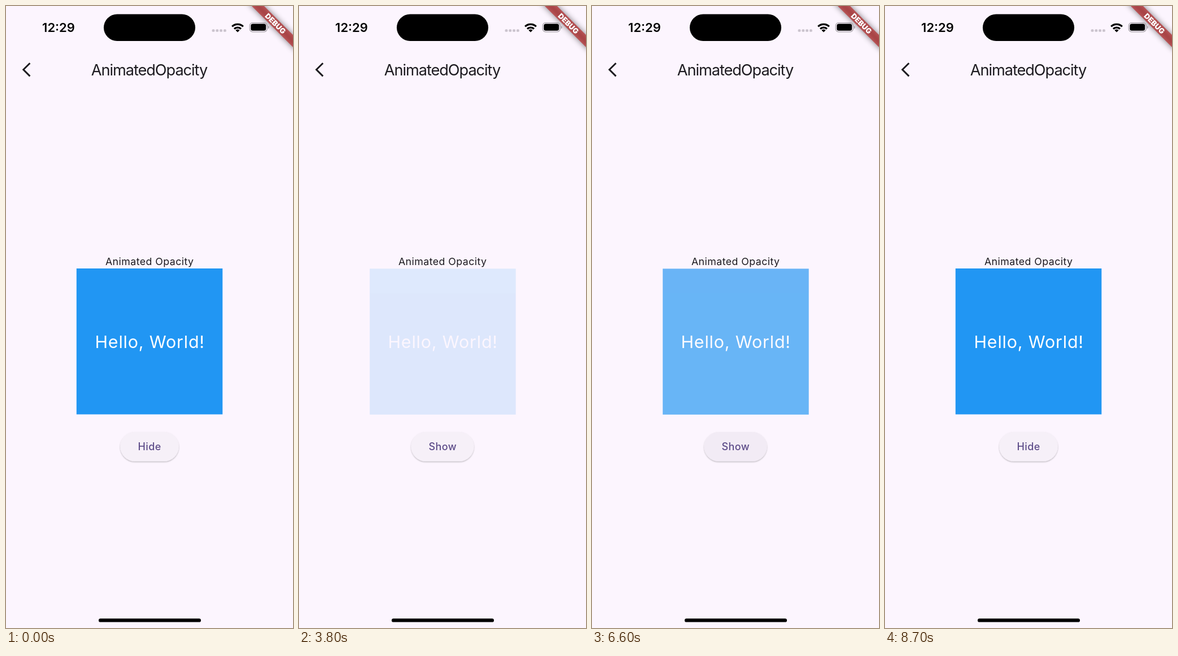
An HTML page for the animation above (8.8 s loop, 508 px wide and 1102 px high).

```html
<!DOCTYPE html>
<html lang="en">
<head>
<meta charset="utf-8">
<title>AnimatedOpacity</title>
<style>
  html, body { margin: 0; width: 100%; height: 100%; overflow: hidden; background: #fcf5fe; }
  svg { display: block; width: 100vw; height: 100vh; }
  text { font-family: Inter, Roboto, sans-serif; font-optical-sizing: none; text-anchor: middle; fill: #1d1b20; }
</style>
</head>
<body>
<svg viewBox="0 0 508 1102" xmlns="http://www.w3.org/2000/svg">
  <defs>
    <clipPath id="pill"><rect class="pill" y="754.8" height="51.8" rx="25.9"/></clipPath>
    <filter id="lift" x="-20%" y="-30%" width="140%" height="160%">
      <feDropShadow dx="0" dy="1.3" stdDeviation="1.2" flood-color="#000" flood-opacity=".28"/>
    </filter>
    <filter id="soft" x="-30%" y="-150%" width="160%" height="400%">
      <feGaussianBlur stdDeviation="5.1"/>
    </filter>
  </defs>
  <rect width="508" height="1102" fill="#fcf5fe"/>

  <!-- status bar -->
  <text x="93" y="46" font-size="22" font-weight="600" style="fill:#000">12:29</text>
  <rect x="173" y="14.5" width="162" height="47.5" rx="23.75"/>
  <g fill="#cbc4ce">
    <rect x="364.6" y="41.2" width="4.8" height="4.6" rx="1.6"/>
    <rect x="371.4" y="41.2" width="4.8" height="4.6" rx="1.6"/>
    <rect x="378.2" y="41.2" width="4.8" height="4.6" rx="1.6"/>
    <rect x="385" y="41.2" width="4.8" height="4.6" rx="1.6"/>
  </g>
  <g fill="none" stroke="#000" stroke-width="3.2">
    <path d="M400.2 36.4a14 14 0 0 1 19.6 0"/>
    <path d="M404 40.5a8.6 8.6 0 0 1 12 0"/>
  </g>
  <path d="M406.4 42.9a5.2 5.2 0 0 1 7.2 0L410 46.4z"/>
  <rect x="431.3" y="29.6" width="30.8" height="16.2" rx="5.2" fill="none" stroke="#a9a4ab" stroke-width="1.3"/>
  <rect x="433.3" y="31.6" width="26.8" height="12.2" rx="3.5"/>
  <path d="M463.8 35v5.6a3 3 0 0 0 0-5.6z" fill="#a9a4ab"/>

  <!-- corner ribbon -->
  <g transform="translate(508 0) rotate(45)">
    <rect x="-60" y="36.2" width="120" height="15.5" fill-opacity=".5" filter="url(#soft)"/>
    <rect x="-60" y="36.2" width="120" height="15.5" fill="#b71c1c" fill-opacity=".627"/>
    <text y="48.7" font-size="13" font-weight="900" style="fill:#fff">DEBUG</text>
  </g>

  <!-- app bar -->
  <path d="M42.4 101.2 30.8 112.8 42.4 124.4" fill="none" stroke="#1d1b20" stroke-width="3"/>
  <text x="253.5" y="123" font-size="27.2" letter-spacing="-1.07">AnimatedOpacity</text>

  <!-- body -->
  <text x="254.2" y="458.7" font-size="17.8" letter-spacing=".42">Animated Opacity</text>
  <g id="box">
    <rect id="panel" width="258.5" height="258.5" fill="#2196f3"/>
    <text x="254.7" y="606.4" font-size="30.4" letter-spacing=".82" style="fill:#fff">Hello, World!</text>
  </g>
  <rect class="pill" y="754.8" height="51.8" rx="25.9" fill="#f6f0f8" filter="url(#lift)"/>
  <g clip-path="url(#pill)" fill="#65558f">
    <rect id="glow" x="190" y="750" width="130" height="60"/>
    <circle id="ripple"/>
  </g>
  <text id="label" x="254.2" y="787.2" font-size="18" font-weight="500" letter-spacing=".4" style="fill:#5d4c89"></text>

  <rect x="164" y="1085.2" width="181" height="6.4" rx="3.2"/>
</svg>
<script>
const LOOP = 8800, FADE = 1000, INK = 0.09;
const CENTER = { x: 254, y: 780.7 };
const TOUCH = { x: 240.5, y: 774.8 };
const taps = [
  { down: 2830, up: 2940, shows: false },
  { down: 4250, up: 4440, shows: true },
  { down: 6150, up: 6270, shows: false },
  { down: 7515, up: 7695, shows: true }
];

const $ = id => document.getElementById(id);
const clamp = v => Math.min(1, Math.max(0, v));
const mix = (a, b, k) => a + (b - a) * k;
const set = (el, attrs) => {
  for (const key in attrs) el.setAttribute(key, attrs[key]);
};

// cubic-bezier(.25, .1, .25, 1)
function ease(x) {
  const curve = (a, b, s) => 3 * a * s * (1 - s) ** 2 + 3 * b * s * s * (1 - s) + s ** 3;
  let lo = 0, hi = 1;
  for (let i = 0; i < 20; i++) {
    const mid = (lo + hi) / 2;
    if (curve(.25, .25, mid) < x) lo = mid; else hi = mid;
  }
  return curve(.1, 1, lo);
}

// Slow growth while held, quick spread and fade after release.
function drawInk(t, width) {
  const tap = taps.filter(p => t >= p.down).pop();
  if (!tap) {
    set($('glow'), { 'fill-opacity': 0 });
    set($('ripple'), { 'fill-opacity': 0 });
    return;
  }
  const held = Math.min(t, tap.up) - tap.down;
  const freed = Math.max(0, t - tap.up);
  const spread = ease(clamp(held / 1000 + freed / 180));
  const reach = Math.hypot(width, 51.8) / 2;
  const fade = clamp((t - tap.down) / 75) * (1 - clamp((freed - 225) / 150));
  set($('glow'), { 'fill-opacity': INK * clamp(clamp(held / 200) - freed / 200) });
  set($('ripple'), {
    cx: mix(TOUCH.x, CENTER.x, spread),
    cy: mix(TOUCH.y, CENTER.y, spread),
    r: reach * mix(.3, 1, spread),
    'fill-opacity': INK * fade
  });
}

function draw(t) {
  const last = taps.filter(p => t >= p.up).pop();
  const shown = !last || last.shows;
  const progress = last ? clamp((t - last.up) / FADE) : 1;
  const opacity = shown ? progress : 1 - progress;
  const nudge = opacity < 1 ? .4 : 0;
  const width = shown ? 103.6 : 111.2;

  set($('box'), { opacity });
  set($('panel'), { x: 124.8 + nudge, y: 465 + nudge });
  $('label').textContent = shown ? 'Hide' : 'Show';
  document.querySelectorAll('.pill').forEach(el => set(el, { x: CENTER.x - width / 2, width }));
  drawInk(t, width);
}

const start = performance.now();
function tick() {
  draw((performance.now() - start) % LOOP);
  requestAnimationFrame(tick);
}
tick();
</script>
</body>
</html>
```
